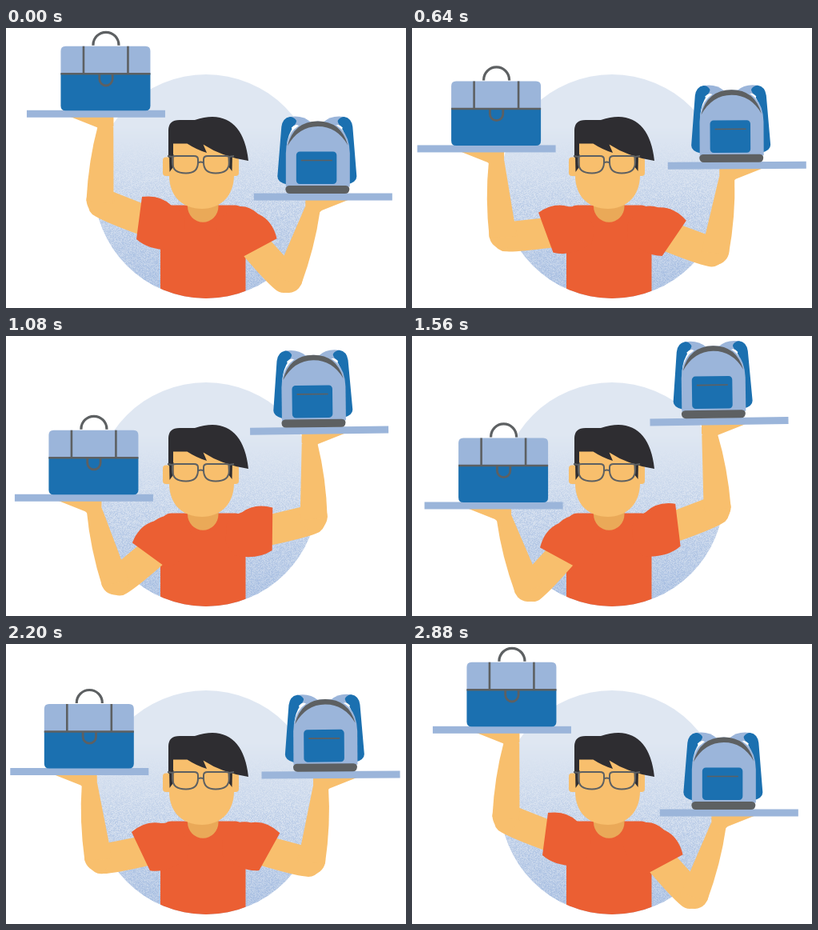
An HTML page with a canvas that plays this animation: 500 by 350 pixels, repeating every 2920 ms.

```html
<!DOCTYPE html>
<html lang="en">
<head>
<meta charset="utf-8">
<title>Balancing two bags</title>
<style>
  html, body { margin: 0; width: 100%; height: 100%; overflow: hidden; background: #fff; }
  canvas, svg { position: absolute; left: 0; top: 0; width: 500px; height: 350px; display: block; }
  canvas { clip-path: circle(140px at 250px 198px); }
  .light { fill: #9bb5da; }
  .blue { fill: #1b70b0; }
  .gray { fill: #5d6062; }
  .line { fill: none; stroke: #5d6062; }
  .skin { fill: #f8bf6d; }
  .shade { fill: #eaa958; }
  .shirt { fill: #eb5f33; }
  .hair { fill: #2e2d31; }
</style>
</head>
<body>
<canvas id="disc" width="500" height="350"></canvas>
<svg viewBox="0 0 500 350">
  <defs>
    <clipPath id="round"><circle cx="250" cy="198" r="140"/></clipPath>
    <path id="upper" class="skin" d="M163 257 Q125 243 112 235.500 Q102 231 102 217 L127 202 L170 219 L190 228 L180 262 Z"/>
    <g id="fore" class="skin">
      <circle r="17.5"/>
      <path d="M-17.5 2 Q-18 -48 -9 -92 H10.5 L16 -8 V4 Z"/>
    </g>
    <path id="hand" class="skin" d="M54 8 H108.500 V20 L98 30 L88 21.500 Z"/>
    <path id="sleeve" class="shirt" d="M170 211 Q193 208 207 222 Q220 228 224 240 L222 262 L210 277 Q180 279 163 264 Z"/>
    <rect id="tray" class="light" width="173" height="9"/>
    <g id="strap">
      <path class="light" d="M355 111.500 Q371 109 381 118 L368 125 L357 122 Z"/>
      <path class="blue" d="M355 111.500 Q346 113 344.500 124 L339.500 186 Q339.500 193 351 196 V148 Q352 134 360 123 Q364 118 363 116 Q360 111.500 355 111.500 Z"/>
      <path fill="#fff" d="M357 125 Q362 119 367 123 L359 130 Z"/>
    </g>
    <path id="lens" d="M202 160 L208 161 Q209 160 213 160 H235 Q240 160 240 164 V168 Q240 181.500 225 181.500 Q208 181.500 208 168 V161"/>
  </defs>

  <g class="shirt" clip-path="url(#round)">
    <path d="M193 340 V235 Q195 222 207 221.500 H286 Q298 222 299.500 235 V340 Z"/>
  </g>

  <g id="left"></g>
  <g id="right" transform="translate(498.8 -1.6) scale(-1 1)"></g>

  <path class="shade" d="M227 205 H265.500 V223 A19.250 19.750 0 0 1 227 223 Z"/>
  <g class="skin">
    <rect x="196" y="161.500" width="14" height="23.500" rx="4"/>
    <rect x="278" y="161.500" width="13" height="23.500" rx="4"/>
    <path d="M204 140 H285 V184 C285 210 268 226 245 226 C220 226 204 210 204 184 Z"/>
  </g>
  <g class="hair">
    <path d="M203 162 V128 Q203 115 217 115 H236 Q248 111 258 111 Q297 112 303 166 Q270 161 246.500 145.500 L251 156 Q238 152 226.500 144.500 H209 V160 Z"/>
    <path d="M204 158 H209.500 V173 L204.500 180 Z"/>
    <path d="M277.500 158 H283 L282.500 179 L278 173 Z"/>
  </g>
  <g class="line" stroke-width="2">
    <use href="#lens"/>
    <use href="#lens" transform="translate(487 0) scale(-1 1)"/>
    <path d="M240 168.500 Q243.500 166.500 247 168.500"/>
  </g>

  <g id="case">
    <use href="#tray"/>
    <g transform="translate(-26 -103)">
      <path class="light" d="M68.500 58 V29 Q68.500 23 74.500 23 H174.500 Q180.500 23 180.500 29 V58 Z"/>
      <path class="blue" d="M68.500 57 H180.500 V97.500 Q180.500 103.500 174.500 103.500 H74.500 Q68.500 103.500 68.500 97.500 Z"/>
      <path class="line" stroke-width="2.6" d="M68.500 57.500 H180.500 M97 23 V57 M152.500 23 V57"/>
      <path class="line" stroke-width="3.2" d="M109 22 V21.500 A16 16 0 0 1 141 21.500 V22"/>
      <path class="line" stroke-width="2.8" d="M116.800 58 V64 A8.200 8.200 0 0 0 133.200 64 V58"/>
    </g>
  </g>

  <g id="pack">
    <use href="#tray"/>
    <g transform="translate(-310 -207)">
      <use href="#strap"/>
      <use href="#strap" transform="translate(778 0) scale(-1 1)"/>
      <path class="light" d="M350 199 V157 Q351 117 390 117 Q429 117 430 157 V199 Z"/>
      <path class="gray" d="M352 148 Q360 117 390 117 Q419 117 427.500 147 Q414 123.500 390 123.500 Q366 123.500 352 148 Z"/>
      <path class="gray" d="M354 197.500 H425 Q429.500 198 429.500 202 Q429 207.500 424 207.500 H355 Q350 207.500 349.500 202 Q349.500 198 354 197.500 Z"/>
      <rect class="blue" x="363" y="155" width="50.500" height="40.500" rx="4.500"/>
      <path class="line" stroke-width="1.6" d="M369 166 H408"/>
    </g>
  </g>
</svg>
<script>
  const LOOP = 2920, SWING = 1440, STEP = 40;
  const MIRROR = 498.8, LIFT = 1.6, TRAY = 173;
  const SHOULDER = [204, 245], ELBOW = [-86, -30], FOREARM = 94.8;
  const rad = deg => deg * Math.PI / 180;
  const clamp = v => Math.min(1, Math.max(0, v));
  const $ = id => document.getElementById(id);

  // Grainy disc, darker and rougher toward the bottom
  function paintDisc() {
    const ctx = $('disc').getContext('2d');
    const img = ctx.createImageData(500, 350);
    const pale = [223, 231, 242], deep = [163, 187, 224];
    let seed = 7;
    const rand = () => (seed = (seed * 16807) % 2147483647) / 2147483647;
    for (let y = 0; y < 350; y++) {
      const depth = 0.75 * clamp((y - 122) / 208);
      const rough = 0.55 * clamp((y - 140) / 80);
      for (let x = 0; x < 500; x++) {
        const mix = depth + (rand() - 0.5) * rough;
        const i = (y * 500 + x) * 4;
        for (let c = 0; c < 3; c++) img.data[i + c] = pale[c] + (deep[c] - pale[c]) * mix;
        img.data[i + 3] = 255;
      }
    }
    ctx.putImageData(img, 0, 0);
  }

  // cubic-bezier(.46, 0, .54, 1)
  function ease(u) {
    let lo = 0, hi = 1;
    for (let i = 0; i < 24; i++) {
      const s = (lo + hi) / 2, r = 1 - s;
      const x = 1.38 * s * r * r + 1.62 * s * s * r + s * s * s;
      if (x < u) lo = s; else hi = s;
    }
    return lo * lo * (3 - 2 * lo);
  }

  function buildArm(side, raised) {
    const arm = { raised };
    for (const name of ['upper', 'fore', 'hand', 'sleeve']) {
      const use = document.createElementNS('http://www.w3.org/2000/svg', 'use');
      use.setAttribute('href', '#' + name);
      arm[name] = $(side).appendChild(use);
    }
    return arm;
  }

  const move = (el, value) => el.setAttribute('transform', value);

  // drop: 0 is raised, 1 is lowered. Returns the tray corner.
  function poseArm(arm, drop) {
    const turn = -69.5 * drop, lean = arm.raised + (-19.6 - arm.raised) * drop;
    const c = Math.cos(rad(turn)), s = Math.sin(rad(turn));
    const ex = SHOULDER[0] + ELBOW[0] * c - ELBOW[1] * s;
    const ey = SHOULDER[1] + ELBOW[0] * s + ELBOW[1] * c;
    const x = ex + FOREARM * Math.sin(rad(lean)) - 98;
    const y = ey - FOREARM * Math.cos(rad(lean)) - 17.6;
    const spin = `rotate(${turn} ${SHOULDER})`;
    move(arm.upper, spin);
    move(arm.sleeve, spin);
    move(arm.fore, `translate(${ex} ${ey}) rotate(${lean})`);
    move(arm.hand, `translate(${x} ${y})`);
    return [x, y];
  }

  const left = buildArm('left', 3.6), right = buildArm('right', 5.4);

  function draw(ms) {
    const t = Math.floor((ms % LOOP) / STEP) * STEP;
    const half = LOOP / 2;
    const u = ease(clamp((t % half) / SWING));
    const p = t < half ? u : 1 - u;
    const [lx, ly] = poseArm(left, p);
    const [rx, ry] = poseArm(right, 1 - p);
    move($('case'), `translate(${lx} ${ly})`);
    move($('pack'), `translate(${MIRROR - rx - TRAY} ${ry - LIFT}) rotate(${-0.8 * p} 86 4)`);
  }

  paintDisc();
  draw(0);
  let start = null;
  requestAnimationFrame(function tick(now) {
    if (start === null) start = now;
    draw(now - start);
    requestAnimationFrame(tick);
  });
</script>
</body>
</html>
```
